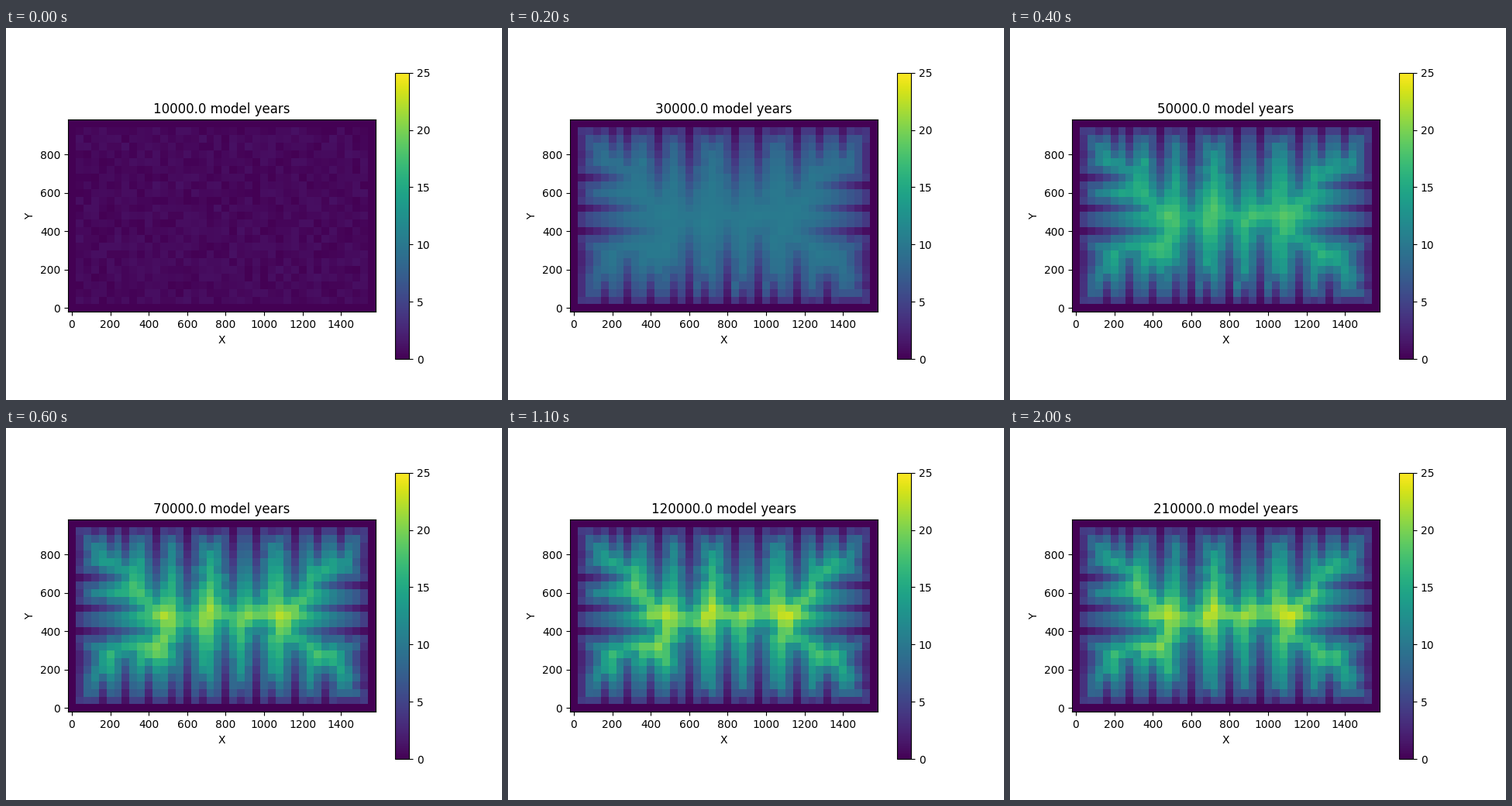
A matplotlib script for the animation above (2.1 s loop, 640 by 480 pixels).

```python
import numpy as np
import matplotlib.pyplot as plt
from matplotlib.animation import FuncAnimation

ROWS, COLS, DX = 25, 40, 40.0
FRAMES, SPAN, DT = 21, 10000, 1000
UPLIFT, ERODE, DIFFUSE = 5e-4, 1e-4, 0.01

# Valleys cut in from each edge: {column or row: length in cells}
TOP = {5: 4, 7: 5, 11: 9, 15: 11, 21: 11, 24: 9, 29: 8, 32: 4, 35: 4}
BOTTOM = {4: 3, 7: 6, 10: 3, 13: 4, 15: 11, 17: 3, 20: 11, 22: 3,
          24: 9, 26: 3, 29: 7, 33: 3}
LEFT = {17: 6, 13: 9, 10: 10}
RIGHT = {16: 7, 13: 7, 10: 8}

rng = np.random.default_rng(4)
nodes = np.arange(ROWS * COLS).reshape(ROWS, COLS)
core = nodes[1:-1, 1:-1].ravel()
offsets = np.array([1, -1, COLS, -COLS,
                    COLS + 1, COLS - 1, 1 - COLS, -1 - COLS])
near = core[:, None] + offsets
dist = np.where(np.arange(8) < 4, 1.0, np.sqrt(2))


def valley_tree():
    """Receivers along the cheapest way out, valleys being cheap."""
    cost = 1 + 0.3 * rng.random((ROWS, COLS))
    for c, n in TOP.items():
        cost[-1 - n:-1, c] = 0.35
    for c, n in BOTTOM.items():
        cost[1:1 + n, c] = 0.35
    for r, n in LEFT.items():
        cost[r, 1:1 + n] = 0.35
    for r, n in RIGHT.items():
        cost[r, -1 - n:-1] = 0.35
    step = cost.ravel()[core][:, None] * dist
    way = np.zeros(ROWS * COLS)
    way[core] = 1e3
    for _ in range(80):
        way[core] = (way[near] + step).min(axis=1)
    rec = np.arange(ROWS * COLS)
    best = (way[near] + step).argmin(axis=1)
    rec[core] = near[np.arange(core.size), best]
    return rec, core[np.argsort(way[core])]


def steepest(z):
    """Receivers along the steepest descent."""
    slope = (z[core][:, None] - z[near]) / dist
    best = slope.argmax(axis=1)
    pick = np.arange(core.size)
    rec = np.arange(z.size)
    rec[core] = np.where(slope[pick, best] > 0, near[pick, best], core)
    return rec, core[np.argsort(z[core])]


def erode(z, rec, order):
    """Implicit stream power step, from the outlets upward."""
    area = np.ones(z.size)
    for i in order[::-1]:
        if rec[i] != i:
            area[rec[i]] += area[i]
    straight = np.isin(np.abs(rec - np.arange(z.size)), (1, COLS))
    length = np.where(straight, 1.0, np.sqrt(2))
    f = ERODE * DT * np.sqrt(area) / length
    for i in order:
        r = rec[i]
        if z[r] < z[i]:
            z[i] = (z[i] + f[i] * z[r]) / (1 + f[i])


def evolve():
    z = np.zeros(ROWS * COLS)
    z[core] = rng.random(core.size)
    rec, order = valley_tree()
    states = [z.copy()]
    for k in range(1, FRAMES):
        for _ in range(SPAN // DT):
            z[core] += UPLIFT * DT
            bend = z[near[:, :4]].sum(axis=1) - 4 * z[core]
            z[core] += DIFFUSE * DT / DX**2 * bend
            if k > 5:
                rec, order = steepest(z)
            erode(z, rec, order)
        states.append(z.copy())
    return [s.reshape(ROWS, COLS) for s in states]


heights = evolve()

fig, ax = plt.subplots(figsize=(6.4, 4.8), dpi=100)
x_edges = (np.arange(COLS + 1) - 0.5) * DX
y_edges = (np.arange(ROWS + 1) - 0.5) * DX
mesh = ax.pcolormesh(x_edges, y_edges, heights[0],
                     cmap="viridis", vmin=0, vmax=25)
ax.set_aspect("equal")
ax.set_xlabel("X")
ax.set_ylabel("Y")
title = ax.set_title("")
fig.colorbar(mesh, ax=ax)


def update(k):
    mesh.set_array(heights[k])
    title.set_text(f"{(k + 1) * float(SPAN)} model years")
    return mesh, title


anim = FuncAnimation(fig, update, frames=FRAMES, interval=100,
                     repeat=True, repeat_delay=0, blit=False)
plt.show()
```
